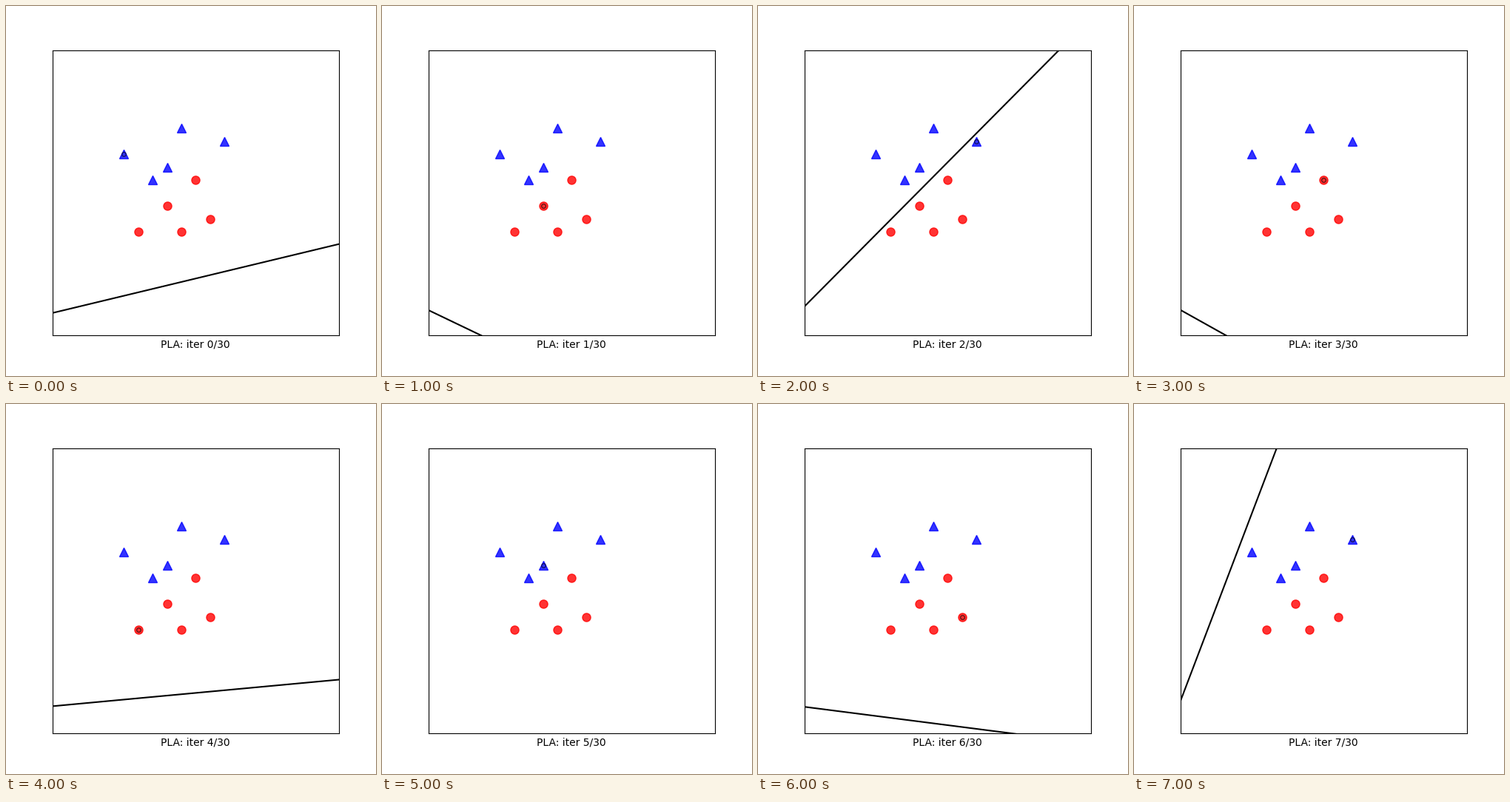
Animation, 500 px wide and 500 px high, one loop 8 s. Source, as a matplotlib script:

```python
import numpy as np
import matplotlib.pyplot as plt
from matplotlib.animation import FuncAnimation

STEPS = 30

blue = np.array([(5, 12), (7, 10), (8, 11), (9, 14), (12, 13)])
red = np.array([(6, 6), (8, 8), (9, 6), (10, 10), (11, 7)])
points = np.vstack([blue, red])
labels = np.repeat([1, -1], [len(blue), len(red)])
inputs = np.column_stack([np.ones(len(points)), points])

# Index of the misclassified point corrected at each iteration
picks = [0, 6, 4, 8, 5, 2, 9, 4]


def weights_at(i):
    """Bias, x and y weights after i perceptron updates."""
    used = picks[:i]
    return np.array([-0.48, 0.458, -1.72]) + labels[used] @ inputs[used] if used \
        else np.array([-0.48, 0.458, -1.72])


fig, ax = plt.subplots(figsize=(5, 5), dpi=100)
ax.set(xlim=(0, 20), ylim=(-2, 20), xticks=[], yticks=[])
ax.plot(*blue.T, "b^", markersize=8, alpha=0.8)
ax.plot(*red.T, "ro", markersize=8, alpha=0.8)
boundary, = ax.plot([], [], "k-", linewidth=1.5)
ring, = ax.plot([], [], "ko", markersize=4, fillstyle="none", alpha=0.6)
xs = np.array([0, 20])


def update(i):
    bias, wx, wy = weights_at(i)
    boundary.set_data(xs, -(bias + wx * xs) / wy)
    ring.set_data(*points[picks[i:i + 1]].T)
    ax.set_xlabel(f"PLA: iter {i}/{STEPS}")
    return boundary, ring


anim = FuncAnimation(fig, update, frames=len(picks), interval=1000,
                     init_func=lambda: update(0), repeat=True, repeat_delay=0)
plt.show()
```
